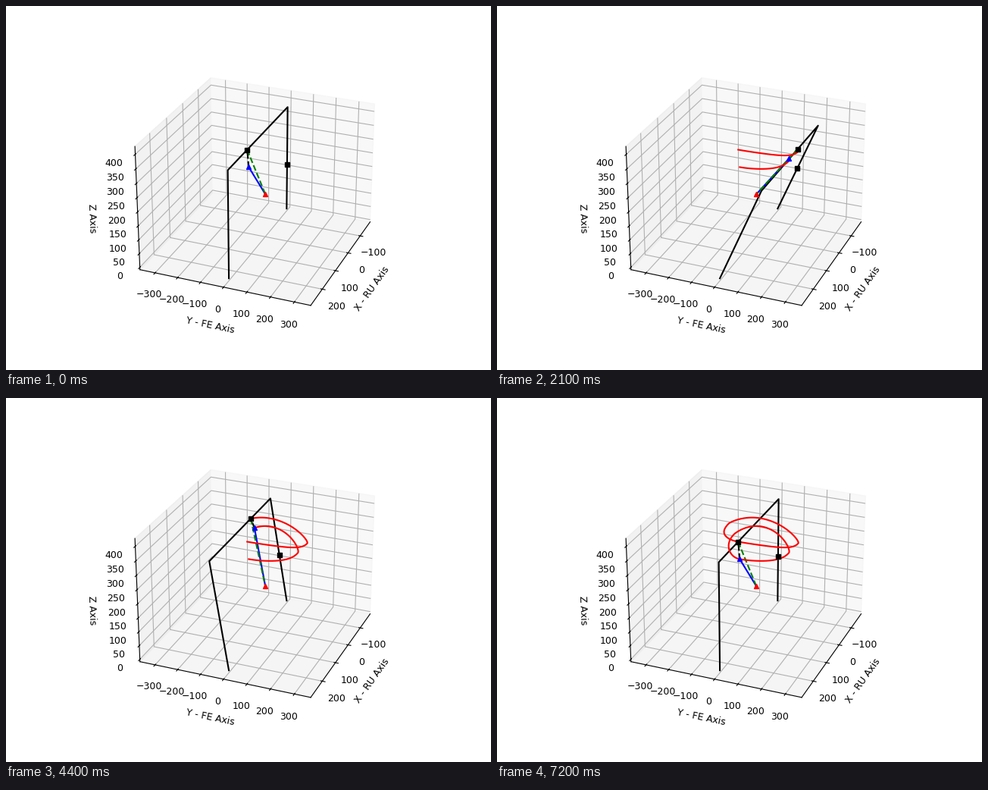
A matplotlib script for the animation above (7300 ms loop, 640 by 480 pixels).

```python
import numpy as np
import matplotlib.pyplot as plt
from matplotlib.animation import FuncAnimation

FRAMES = 73
ARCH_X = (250, -160)      # front and back leg
ARCH_HEIGHT = 380
WRIST = np.array([0, 0, 150])
HAND_RADIUS = 200
DRIVE_HEIGHT = 168        # slider on the back leg


def swing(value, high, low):
    """Scale a -1..1 wave with separate limits for each side, in radians."""
    return np.radians(np.where(value > 0, high, low) * value)


# Joint angles over one full sweep
turn = np.radians(5 * np.arange(FRAMES))
flex = swing(np.sin(turn), 45, 30)
dev = swing(np.cos(turn), 35, 10)

# The arch leans until its top bar meets the flexion plane of the wrist
lean = flex - np.arcsin(WRIST[2] / ARCH_HEIGHT * np.sin(flex))
top_y = ARCH_HEIGHT * np.sin(lean)
top_z = ARCH_HEIGHT * np.cos(lean)

hand = WRIST + HAND_RADIUS * np.column_stack(
    [np.sin(dev), np.cos(dev) * np.sin(flex), np.cos(dev) * np.cos(flex)])
block = np.column_stack([3 + 174 * np.tan(dev), top_y, top_z])
drive = np.column_stack([np.full(FRAMES, ARCH_X[1]),
                         DRIVE_HEIGHT * np.tan(lean),
                         np.full(FRAMES, DRIVE_HEIGHT)])

plt.rcParams.update({"font.size": 9, "lines.markersize": 5})
fig = plt.figure(figsize=(6.4, 4.8), dpi=100)
ax = fig.add_subplot(projection="3d")
ax.view_init(elev=27, azim=22)


def padded(low, high):
    pad = (high - low) / 48
    return low - pad, high + pad


ax.set_xlim(*padded(1.1 * ARCH_X[1], 1.1 * ARCH_X[0]))
ax.set_ylim(*padded(-353, 353))
ax.set_zlim(*padded(0, 1.1 * ARCH_HEIGHT))
ax.set_xticks(range(-100, 201, 100))
ax.set_yticks(range(-300, 301, 100))
ax.set_zticks(range(0, 401, 50))
ax.set_xlabel("X - RU Axis")
ax.set_ylabel("Y - FE Axis")
ax.set_zlabel("Z Axis")


def line(style):
    return ax.plot([], [], [], style)[0]


arch = line("k-")
link = line("k--")
arm = line("b-")
reach = line("g--")
block_trace = line("r-")
hand_trace = line("r-")
block_mark = line("ks")
drive_mark = line("ks")
hand_mark = line("b^")
wrist_mark = line("r^")


def place(artist, *points):
    artist.set_data_3d(*np.array(points).T)


def update(i):
    front, back = ARCH_X
    y, z = top_y[i], top_z[i]
    place(arch, (front, 0, 0), (front, y, z), (back, y, z), (back, 0, 0))
    place(arm, WRIST, hand[i])
    place(link, hand[i], block[i])
    place(reach, block[i], WRIST)
    place(block_trace, *block[:i + 1])
    place(hand_trace, *hand[:i + 1])
    place(block_mark, block[i])
    place(drive_mark, drive[i])
    place(hand_mark, hand[i])
    place(wrist_mark, WRIST)
    return ()


anim = FuncAnimation(fig, update, frames=FRAMES, interval=100,
                     repeat=True, repeat_delay=0, blit=False)
plt.show()
```
